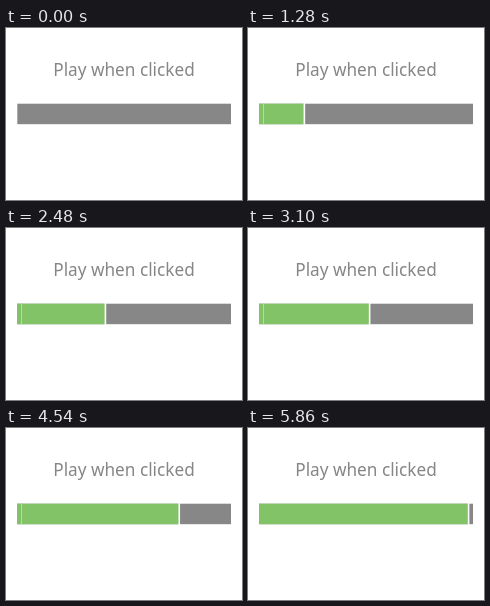
An HTML page for the animation above (5880 ms loop, 236 by 172 pixels).

```html
<!DOCTYPE html>
<html lang="en">
<head>
<meta charset="utf-8">
<title>Play when clicked</title>
<style>
  html, body { margin: 0; width: 100%; height: 100%; overflow: hidden; background: #fff; }
  svg { display: block; }
  text { font: 17.2px "Noto Sans", "Open Sans", sans-serif; fill: #868686; }
</style>
</head>
<body>
<svg width="236" height="172" viewBox="0 0 236 172">
  <text x="118" y="48" text-anchor="middle">Play when clicked</text>
  <rect x="11" y="75.7" width="214" height="20.5" fill="#878787"/>
  <rect id="fill" x="11" y="75.7" height="20.5" fill="#82c368"/>
  <rect id="trace" x="15" y="75.7" width="1" height="20.5" fill="#b4dba4"/>
  <rect id="head" y="75" width="1.6" height="22" fill="#fff"/>
</svg>
<script>
  const LOOP = 5880, STEP = 20, START = 10.5, SPEED = 0.03585;
  const [fill, trace, head] = ["fill", "trace", "head"].map(id => document.getElementById(id));

  function draw(now) {
    const t = Math.floor(now % LOOP / STEP) * STEP;
    const x = START + SPEED * t;
    fill.setAttribute("width", Math.max(0, x - 11));
    head.setAttribute("x", x - 0.8);
    // The head leaves a faint line behind until late in the loop.
    trace.setAttribute("visibility", t >= 160 && t < 5100 ? "visible" : "hidden");
  }

  const begin = performance.now();
  function tick() {
    draw(performance.now() - begin);
    requestAnimationFrame(tick);
  }
  tick();
</script>
</body>
</html>
```
